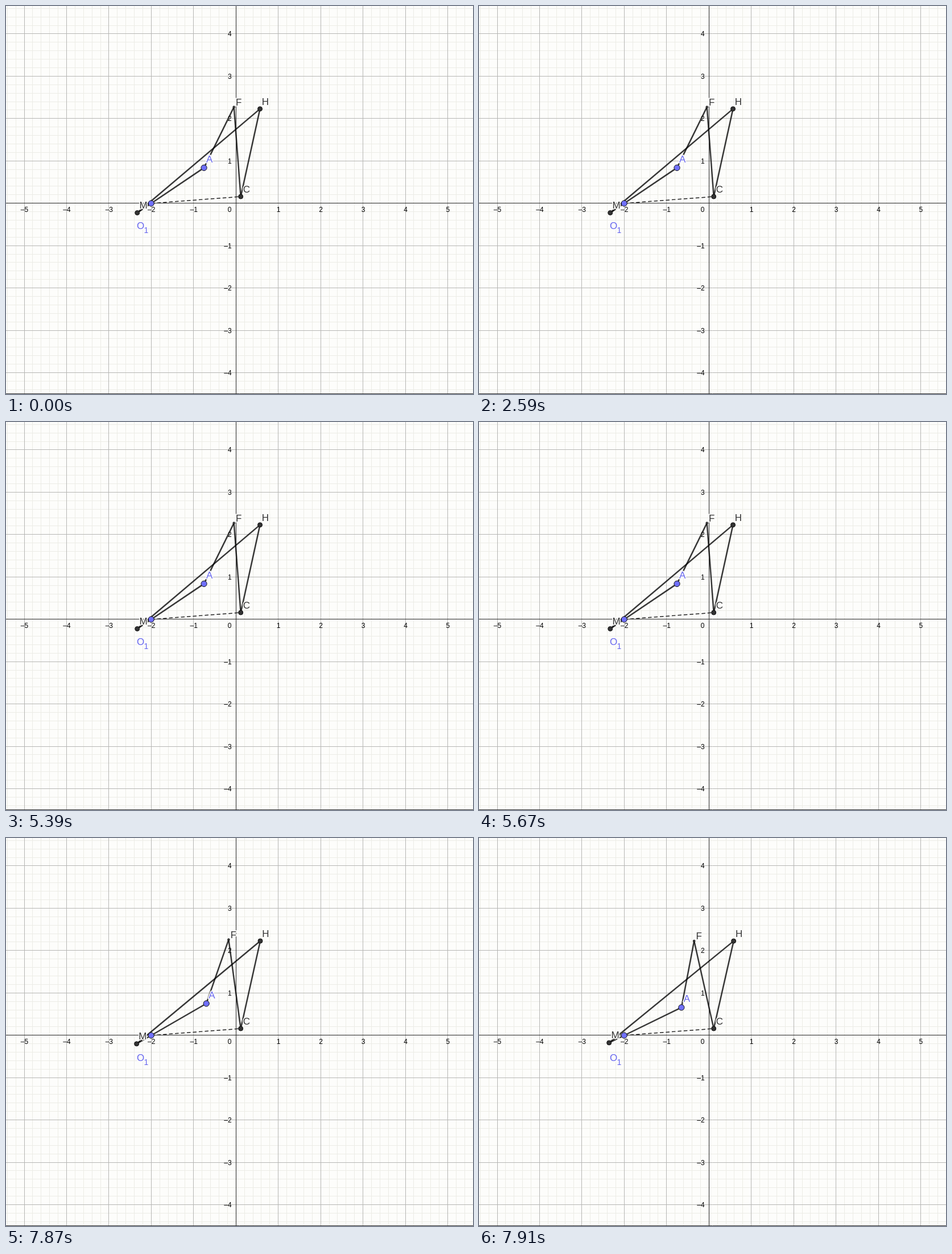
Animation of 821x682 px, one loop 8 s. Source, as an HTML page with a canvas:

```html
<!DOCTYPE html>
<html lang="en">
<head>
<meta charset="utf-8">
<title>Linkage</title>
<style>
  html, body { margin: 0; width: 100%; height: 100%; overflow: hidden; background: #fdfdfb; }
  canvas { display: block; }
</style>
</head>
<body>
<canvas id="stage" width="821" height="682"></canvas>
<script>
const W = 821, H = 682, LOOP = 8000;
const UNIT = 74.45, OX = 404.28, OY = 346.7;
const SANS = '"Liberation Sans", Arial, sans-serif';
const DARK = '#333333', BLUE = '#7070ff', BLUE_TEXT = '#6464ee';
const ctx = document.getElementById('stage').getContext('2d');

// Crank angle in degrees, held from each time (ms) on.
const STEPS = [[0, 34], [7870, 30], [7890, 28], [7910, 26]];

// Fixed pivots and bar lengths in pixels.
const O = { x: 255.2, y: 347 }, C = { x: 412.7, y: 335 };
const CRANK = 112, TAIL = 29.5, AF = 119, MH = 282.7, ROCKER = 157.8;

function polar(r, deg) {
  const a = deg * Math.PI / 180;
  return { x: O.x + r * Math.cos(a), y: O.y - r * Math.sin(a) };
}

// Upper crossing of the circles (p, rp) and (q, rq), with p left of q.
function joint(p, rp, q, rq) {
  const dx = q.x - p.x, dy = q.y - p.y, d = Math.hypot(dx, dy);
  const along = (rp * rp - rq * rq + d * d) / (2 * d);
  const up = Math.sqrt(Math.max(0, rp * rp - along * along));
  return {
    x: p.x + (along * dx + up * dy) / d,
    y: p.y + (along * dy - up * dx) / d
  };
}

function line(x1, y1, x2, y2, color, width) {
  ctx.strokeStyle = color;
  ctx.lineWidth = width;
  ctx.beginPath();
  ctx.moveTo(x1, y1);
  ctx.lineTo(x2, y2);
  ctx.stroke();
}

function bar(p, q) {
  line(p.x, p.y, q.x, q.y, 'rgba(0,0,0,.78)', 2.5);
}

function dot(p, r, fill) {
  ctx.beginPath();
  ctx.arc(p.x, p.y, r, 0, 2 * Math.PI);
  ctx.fillStyle = fill;
  ctx.fill();
  ctx.strokeStyle = '#111';
  ctx.lineWidth = 1;
  ctx.stroke();
}

function label(text, x, y, color, size = 17) {
  ctx.font = size + 'px ' + SANS;
  ctx.textAlign = 'left';
  ctx.strokeStyle = '#fdfdfb';
  ctx.lineWidth = 3.5;
  ctx.lineJoin = 'round';
  ctx.strokeText(text, x, y);
  ctx.fillStyle = color;
  ctx.fillText(text, x, y);
}

const snap = v => Math.floor(v) + 0.5;

function gridLines(step, color) {
  for (let i = -30; i <= 30; i++) {
    const x = snap(OX + i * step), y = snap(OY + i * step);
    line(x, 0, x, H, color, 1);
    line(0, y, W, y, color, 1);
  }
}

function drawPlane() {
  ctx.fillStyle = '#fdfdfb';
  ctx.fillRect(0, 0, W, H);
  gridLines(UNIT / 5, '#ecece6');
  gridLines(UNIT, '#b6b6b4');
  line(0, 346.5, W, 346.5, '#252525', 1);
  line(404.5, 0, 404.5, H, '#252525', 1);
  line(0, 681.5, W, 681.5, '#333', 1);

  ctx.font = '12px ' + SANS;
  ctx.fillStyle = '#000';
  for (let n = -5; n <= 5; n++) {
    const text = n < 0 ? '\u2013' + -n : String(n);
    ctx.textAlign = 'center';
    ctx.fillText(text, n ? OX + n * UNIT + 0.4 : 393, 362);
    if (n && Math.abs(n) < 5) {
      ctx.textAlign = 'right';
      ctx.fillText(text, 396.6, OY - n * UNIT + 4.5);
    }
  }
}

function drawLinkage(deg) {
  const A = polar(CRANK, deg), M = polar(-TAIL, deg);
  const F = joint(A, AF, C, ROCKER), T = joint(M, MH, C, ROCKER);

  ctx.setLineDash([6.5, 4]);
  line(O.x, O.y, C.x, C.y, '#222', 1.5);
  ctx.setLineDash([]);
  bar(O, A);
  bar(A, F);
  bar(F, C);
  bar(O, M);
  bar(M, T);
  bar(T, C);

  label('M', M.x + 3.7, M.y - 7.5, DARK);
  label('A', A.x + 4, A.y - 9.5, BLUE_TEXT);
  label('F', F.x + 3.3, F.y - 3, DARK);
  label('H', T.x + 3.3, T.y - 7, DARK);
  label('C', C.x + 4, C.y - 7.5, DARK);
  label('O', 230, 392, BLUE_TEXT);
  label('1', 242.6, 399, BLUE_TEXT, 14);

  dot(F, 1.8, '#444');
  for (const p of [M, T, C]) dot(p, 4, DARK);
  for (const p of [O, A]) dot(p, 5.1, BLUE);
}

const start = performance.now();
function frame() {
  const t = (performance.now() - start) % LOOP;
  const step = STEPS.filter(s => s[0] <= t).pop();
  drawPlane();
  drawLinkage(step[1]);
  requestAnimationFrame(frame);
}
frame();
</script>
</body>
</html>
```
